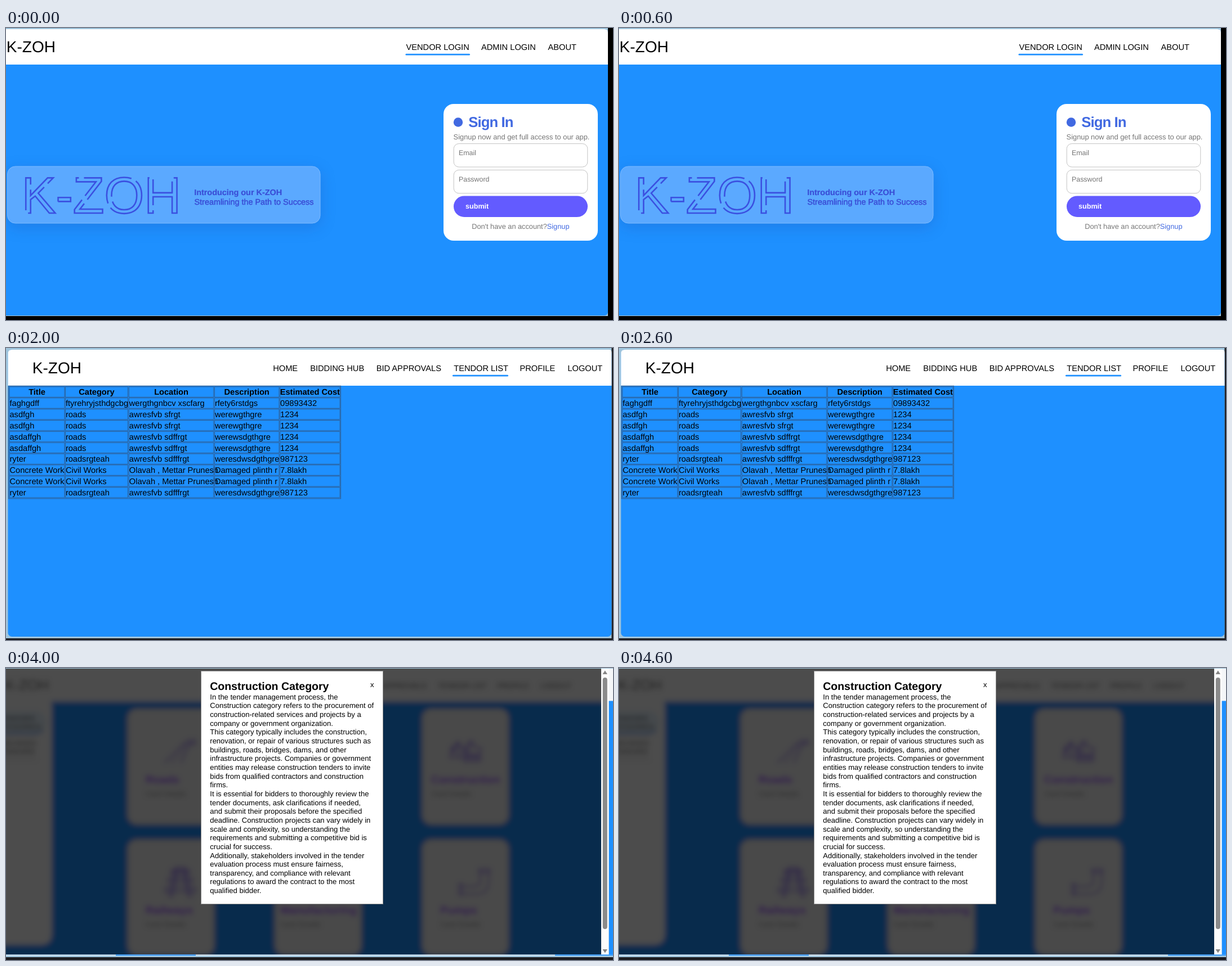
An HTML page that plays this animation: 1078 px wide and 519 px high, repeating every 5000 ms.

```html
<!DOCTYPE html>
<html lang="en">
<head>
<meta charset="utf-8">
<title>Tender portal tour</title>
<style>
html, body { margin: 0; width: 100%; height: 100%; overflow: hidden; background: #000; }
#stage { display: block; width: 1078px; height: 519px; }
text { font-family: "Liberation Sans", Arial, sans-serif; text-rendering: geometricPrecision; white-space: pre; }
.scene { opacity: 0; animation: show 5s step-end infinite; }
.icon { fill: none; stroke: #7c3aed; stroke-width: 2.2; stroke-linejoin: round; }
@keyframes show { 0% { opacity: 1; } 20%, 100% { opacity: 0; } }
</style>
</head>
<body>
<svg id="stage" viewBox="0 0 1078 519" xmlns="http://www.w3.org/2000/svg">
  <defs>
    <filter id="blur" x="-10%" y="-10%" width="120%" height="120%"><feGaussianBlur stdDeviation="5"/></filter>
    <filter id="soft" x="-20%" y="-50%" width="140%" height="200%"><feGaussianBlur stdDeviation="14"/></filter>
    <filter id="edge" x="-10%" y="-10%" width="120%" height="120%"><feGaussianBlur stdDeviation="2"/></filter>
  </defs>
</svg>
<script>
const BLUE = '#1e90ff', FRAME = '#9fc4dc', PALE = '#e7f4ff', BRAND = 'K-ZOH';

const text = (x, y, size, str, attrs = '') =>
  `<text x="${x}" y="${y}" font-size="${size}" ${attrs}>${str}</text>`;
const rect = (x, y, w, h, fill, attrs = '') =>
  `<rect x="${x}" y="${y}" width="${w}" height="${h}" fill="${fill}" ${attrs}/>`;
const circle = (x, y, r, fill, attrs = '') =>
  `<circle cx="${x}" cy="${y}" r="${r}" fill="${fill}" ${attrs}/>`;
const path = (d, fill, attrs = '') => `<path d="${d}" fill="${fill}" ${attrs}/>`;
const clip = (x, y, w, h, body) =>
  `<svg x="${x}" y="${y}" width="${w}" height="${h}" viewBox="${x} ${y} ${w} ${h}" overflow="hidden">${body}</svg>`;
const bold = 'font-weight="700"', centre = 'text-anchor="middle"';

const MENU = [['HOME', 441], ['BIDDING HUB', 507], ['BID APPROVALS', 624.5],
  ['TENDOR LIST', 762], ['PROFILE', 879.3], ['LOGOUT', 964.2]];
const menu = (dx, y) => MENU.map(([label, x]) => text(x + dx, y, 14.65, label)).join('');
const underline = (x, y, w) => rect(x, y, w, 2.8, BLUE, 'rx="1.4"');

function loginScene() {
  const grey = 'fill="#757575"';
  const field = (y, label) =>
    rect(795.2, y, 237.6, 41.4, '#fff', 'rx="9" stroke="#c3c3c3"') + text(804, y + 20.3, 12.4, label, grey);
  const ink = 'fill="#3a4ed6" stroke="#3a4ed6"';
  return rect(0, 0, 1078, 519, '#000') + rect(0, 0, 1069, 512, FRAME) +
    rect(-10, 2, 1079, 509, BLUE, 'rx="6"') +
    path('M0 2H1063Q1069 2 1069 8V65H0Z', '#fff') +
    text(.8, 43, 28, BRAND) +
    text(710.5, 38.7, 14.65, 'VENDOR LOGIN') + text(844, 38.7, 14.65, 'ADMIN LOGIN') +
    text(962.5, 38.7, 14.65, 'ABOUT') + underline(709.5, 45.8, 114.5) +
    clip(0, 65, 1069, 446, rect(2, 253, 556, 101, '#1f4fb0', 'rx="14" opacity=".3" filter="url(#soft)"')) +
    rect(2.5, 246, 555.5, 101, '#5ba9ff', 'rx="14" stroke="#7dbaff"') +
    text(27.8, 328.5, 91, BRAND, 'fill="none" stroke="#3b50e0" stroke-width="2.6" stroke-dasharray="78 9"') +
    text(334.2, 297.3, 14.4, `Introducing our ${BRAND}`, `${bold} ${ink} stroke-width=".2"`) +
    text(334.5, 314.3, 14.4, 'Streamlining the Path to Success', `${ink} stroke-width=".5"`) +
    rect(777, 135, 274, 243, '#fff', 'rx="18"') +
    circle(803, 167.5, 8.2, '#4169e1') +
    text(821.3, 176, 25.7, 'Sign In', `${bold} fill="#4169e1" letter-spacing="-.92"`) +
    text(794.6, 198, 12.83, 'Signup now and get full access to our app.', grey) +
    field(205.6, 'Email') + field(252.4, 'Password') +
    rect(795, 298.4, 238, 37.6, '#635bff', 'rx="18.8"') +
    text(816, 321.4, 12.6, 'submit', `${bold} fill="#fff"`) +
    text(827.2, 357, 12.75, `Don't have an account?<tspan fill="#4169e1">Signup</tspan>`, grey);
}

function icons() {
  const line = d => path(d, 'none');
  const ring = (x, y, r) => circle(x, y, r, 'none');
  const box = (x, y, w, h, r = 0) => rect(x, y, w, h, 'none', `rx="${r}"`);
  const road = line('M343 184L380 147Q388 139 398 139H405M375 184L389 154Q392 147 400 147H405') +
    path('M358 184L383 152Q389 143 405 143', 'none', 'stroke-dasharray="8 4"');
  const power = line('M647 178A17.5 17.5 0 0 1 640 148M646 144.5A17.5 17.5 0 0 1 667 168M655 178A17.5 17.5 0 0 0 662 175M634 156A17.5 17.5 0 0 1 636 152' +
    'M638 146L646 145L644 152ZM664 177L657 178L658 171ZM654 150L645 162.5H650.5L648 172L658 159H652Z');
  const digger = box(931, 170.5, 37, 11, 5.5) + [937, 945, 953, 961].map(x => ring(x, 176, 1.3)).join('') +
    line('M938 167V159H933L943 142H953V154H967V167ZM934 158H945V143M926 148L940 162M919 149L931 167H938M919 147L914 151M909 159L906 174H926L915 158M909 166L913 160') +
    ring(922, 145.5, 3.6) + ring(911.5, 155, 3.6);
  const rails = [[395, 17.5, 7], [411, 23, 8], [430, 29, 9]].map(([y, w, h]) =>
    line(`M${374 - w} ${y}H${374 + w}L${376 + w} ${y + h}H${372 - w}Z`)).join('') +
    line('M351 451L366 388M358 451L371 388M397 451L382 388M390 451L377 388');
  const belt = box(608.5, 426, 62, 14.5, 7.2) + [616, 628, 639.5, 651, 663].map(x => ring(x, 433.3, 3)).join('') +
    [[631, 399], [620, 412.5], [642, 412.5]].map(([x, y]) =>
      box(x, y, 16, 12.5) + line(`M${x + 8} ${y}v5`)).join('');
  const pipe = box(963, 393.5, 22, 7, 2) + box(924, 422.5, 6, 22.5, 2) +
    line('M966 401V416Q966 428 954 428H930M982.5 401V418Q982.5 443 958 443H930');
  return `<g class="icon">${road + power + digger + rails + belt + pipe}</g>`;
}

const CARDS = [['Roads', 0, 0, 305, 224], ['Electrical', 1, 0, 597, 210], ['Construction', 2, 0, 868.5, 224],
  ['Railways', 0, 1, 305, 482], ['Manufacturing', 1, 1, 571, 482], ['Pumps', 2, 1, 886.5, 482]];

function hubPage(menuShift, sideBottom) {
  const cards = CARDS.map(([name, col, row, x, y]) =>
    rect(270.5 + col * 290.6, 78 + row * 258, 169.6, 227, '#f5f5f5', 'rx="18" stroke="#b9c5d2" stroke-width="2"') +
    text(x, y, 22, name, `${bold} fill="#9b00ff"`) +
    text(x + .3, y + 25.8, 14.5, 'Card Details', 'fill="#808080"')).join('');
  const side = [['TENDORS', 101.3], ['CATEGORIES', 118], ['ARCHIVED', 150], ['TENDORS', 167]]
    .map(([label, y]) => text(52, y, 14.5, label, centre)).join('');
  return rect(-60, -60, 1500, 700, BLUE) + rect(-60, -60, 1500, 122.6, '#fff') +
    path(`M-60 60H120V${sideBottom - 22}q0 22 -22 22H-60Z`, '#fff') +
    text(27.5, 40.5, 28, BRAND) + menu(menuShift, 36.3) + underline(506 + menuShift, 43.4, 98) +
    rect(-12, 81, 122, 47, PALE, 'rx="23.5"') +
    rect(11, 127.5, 81, 1.2, '#b4b4b4') +
    path('M0 121Q9 126.3 25 126.3H78Q95 126.3 104 121', 'none', `stroke="${BLUE}" stroke-width="2.6"`) +
    rect(11, 177, 81, 1.2, '#b4b4b4') + side + cards + icons();
}

const hubScene = () =>
  rect(0, 0, 1078, 519, '#000') + rect(0, 0, 1069, 511.5, FRAME) +
  rect(0, 0, 1069, 510, BLUE, 'rx="5"') + path('M1060 0H1065Q1069 2 1069 6V65H1060Z', '#fff') +
  clip(0, 0, 1064, 494.5, hubPage(0, 488)) +
  rect(0, 494.5, 1064, 13.5, '#fff') + rect(0, 508, 1064, 3.5, FRAME) +
  rect(.5, 497.5, 1024, 7.5, '#8a8a8a', 'rx="3.7"');

function listScene() {
  const columns = [[6, 98], [105.4, 111], [218.3, 150.5], [370.4, 114.5], [486.6, 106.4]];
  const oddRow = ['ryter', 'roadsrgteah', 'awresfvb sdfffrgt', 'weresdwsdgthgre', '987123'];
  const shortRow = ['asdfgh', 'roads', 'awresfvb sfrgt', 'werewgthgre', '1234'];
  const longRow = ['asdaffgh', 'roads', 'awresfvb sdffrgt', 'werewsdgthgre', '1234'];
  const workRow = ['Concrete Work', 'Civil Works', 'Olavah , Mettar Prunesh', 'Damaged plinth r', '7.8lakh'];
  const rows = [['Title', 'Category', 'Location', 'Description', 'Estimated Cost'],
    ['faghgdff', 'ftyrehryjsthdgcbg', 'wergthgnbcv xscfarg', 'rfety6rstdgs', '09893432'],
    shortRow, shortRow, longRow, longRow, oddRow, workRow, workRow, oddRow];
  const border = 'stroke="#2d5f96" stroke-width="1"';
  const cells = rows.map((row, r) => row.map((str, c) => {
    const [x, w] = columns[c], y = 69 + r * 19.85;
    const label = r ? text(x + .5, y + 14.3, 14.6, str) : text(x + w / 2, y + 14.3, 14.6, str, `${bold} ${centre}`);
    return rect(x, y, w, 18.3, 'none', border) + label;
  }).join('')).join('');
  return rect(0, 0, 1078, 519, '#1c1c20') + rect(0, 0, 1075.5, 516, FRAME) +
    rect(3.5, 3, 1072, 510, BLUE, 'rx="7"') +
    path('M3.5 67V10Q3.5 3 10.5 3H1071Q1075.5 3 1075.5 8V67Z', '#fff') +
    text(46.8, 45, 28, BRAND) + menu(33.2, 40.5) + underline(793, 47.8, 99) +
    rect(4.5, 67.3, 590, 200.5, 'none', border) + cells;
}

function profileScene() {
  const panel = (y, h) =>
    rect(334, y + 1, 645, h, '#46586c', 'rx="14" opacity=".8" filter="url(#edge)"') +
    rect(334, y, 645, h, '#fff', 'rx="14"');
  const heading = (y, str) => text(333.5, y, 19.3, str, `${bold} fill="#2b2f36" style="font-family:'Open Sans',sans-serif"`);
  const facts = [['Company|Name', 159.3, 'XXXXXXXXX'], ['FName', 195, 'qwertu'], ['LName', 220, 'qazxsw'],
    ['Email', 245, 'nolvi@daxu.example'], ['Address', 270, 'pullekovanam, Mensor'], ['Job', 295, 'Building Contractor'],
    ['Previous|Contracts', 331, 'Omvelasta Bronze Limited - OBL Tender, Kelvor Light Electricals|Limited - KLEL Tender']];
  const lines = (x, y, str) => str.split('|').map((part, i, all) =>
    text(x, y + (i - (all.length - 1) / 2) * 15.7, 13.05, part)).join('');
  const table = facts.map(([label, y, value]) =>
    lines(376.3, y, label) + text(471, y, 13, ':') + lines(477, y, value)).join('');
  const badges = Array.from({ length: 7 }, (_, i) => 429.6 + i * 72.3)
    .map(x => circle(x, 479, 19.3, '#000') + circle(x, 479, 9, '#fff')).join('');
  return rect(0, 0, 1078, 519, '#1c1c20') + rect(0, 0, 1078, 514, FRAME) +
    rect(3.5, 2, 1090, 509, BLUE, 'rx="7"') +
    clip(206, 55, 872, 14, rect(180, 54, 920, 7.5, '#46586c', 'filter="url(#edge)"')) +
    path('M3.5 58.5V9Q3.5 2 10.5 2H1078V58.5H206V493Q206 511 188 511H10.5Q3.5 511 3.5 504Z', '#fff') +
    text(522.6, 37.3, 25.6, 'Profile', `${bold} fill="#333" style="font-family:'Liberation Serif',serif"`) +
    path('M1012 19H1008.5V28H1012M1011 23.5H1017', 'none', 'stroke="#222" stroke-width="2"') +
    path('M1015 18.5L1020.5 23.5L1015 28.5Z', '#222') +
    text(1021.5, 28.2, 13.2, 'Home', `font-weight="900" fill="#222" style="font-family:Inter,sans-serif"`) +
    circle(105, 105.8, 41.5, '#fff', 'stroke="#777" stroke-width="3" filter="url(#edge)"') +
    circle(105, 105.5, 41, '#fff', 'stroke="#aaa" stroke-width="1.2"') +
    rect(74.5, 74.5, 4.5, 4.5, '#aaa') + rect(75.3, 75.3, 3, 1.8, '#eee') +
    text(105, 180.5, 16.1, BRAND, `${bold} ${centre} fill="#333"`) +
    text(105, 205, 12.9, 'Vendor', `${bold} ${centre} fill="#333"`) +
    rect(32, 225, 145, 28, PALE, 'rx="14"') + text(104.5, 244.5, 16.1, 'Profile', centre) +
    rect(44, 261, 123, 1, '#aaa') +
    heading(102, 'VENDOR IDENTITY') + panel(115, 251) + table +
    path('M943 147.5L944 142.5L953.5 133L957.5 137L948 146.5ZM954.5 132L956 130.8Q957 130 958 131L959.3 132.4Q960 133.2 959.2 134.2L958.3 135.8Z', '#0000f0') +
    heading(403.5, 'SOCIAL MEDIA') +
    clip(206, 405, 872, 106, panel(417, 130) + rect(377, 451, 2, 2, '#000') + badges);
}

function dialogScene() {
  const body = `In the tender management process, the
Construction category refers to the procurement of
construction-related services and projects by a
company or government organization.
This category typically includes the construction,
renovation, or repair of various structures such as
buildings, roads, bridges, dams, and other
infrastructure projects. Companies or government
entities may release construction tenders to invite
bids from qualified contractors and construction
firms.
It is essential for bidders to thoroughly review the
tender documents, ask clarifications if needed,
and submit their proposals before the specified
deadline. Construction projects can vary widely in
scale and complexity, so understanding the
requirements and submitting a competitive bid is
crucial for success.
Additionally, stakeholders involved in the tender
evaluation process must ensure fairness,
transparency, and compliance with relevant
regulations to award the contract to the most
qualified bidder.`;
  return rect(0, 0, 1078, 519, '#1c1c20') + rect(0, 0, 1078, 514, FRAME) +
    rect(1057, 1, 21, 58, '#f4f6f8') + rect(1070.5, 58.5, 8, 452, BLUE) +
    clip(0, 1, 1057, 508.5,
      `<g filter="url(#blur)"><g transform="translate(-27 3) scale(.9)">${hubPage(120, 543)}</g></g>` +
      rect(0, 0, 1057, 519, '#000', 'opacity=".7"')) +
    rect(1057, 1, 13.5, 508.5, '#fcfcfc') + rect(1059.8, 17, 8, 447, '#8a8a8a', 'rx="4"') +
    path('M1059.5 11L1063.8 4.5L1068 11ZM1059.5 500L1063.8 506.5L1068 500Z', '#858585') +
    rect(0, 509.5, 1078, 1.7, '#e4f1fa') + rect(195, 509.5, 142, 1.7, BLUE) + rect(975, 509.5, 103, 1.7, BLUE) +
    rect(346.5, 5.5, 323, 414, '#fff', 'stroke="#8a8a8a"') +
    text(362.2, 39, 19.5, 'Construction Category', bold) + text(647, 33.5, 13, 'x') +
    body.split('\n').map((str, i) => text(362.3, 55.8 + i * 15.65, 13.02, str)).join('');
}

const scenes = [loginScene, hubScene, listScene, profileScene, dialogScene];
document.getElementById('stage').insertAdjacentHTML('beforeend', scenes.map((draw, i) =>
  `<g class="scene" style="animation-delay:${i}s">${draw()}</g>`).join(''));
</script>
</body>
</html>
```
